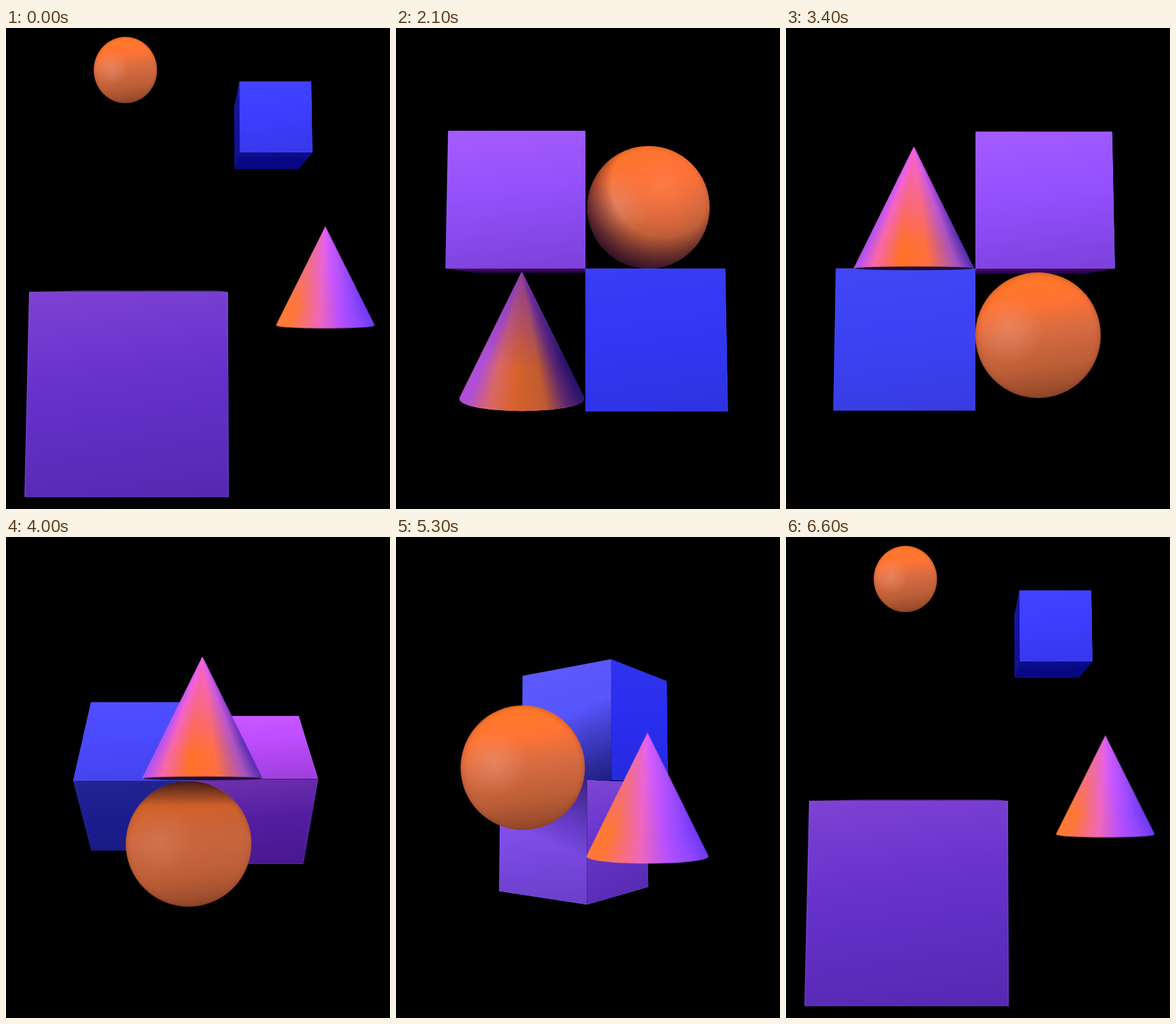
An HTML page without scripts for the animation above (6700 ms loop, 600x750 px).

```html
<!DOCTYPE html>
<html lang="en">
<head>
<meta charset="utf-8">
<title>Turning solids</title>
<style>
html, body { margin: 0; width: 100%; height: 100%; overflow: hidden; background: #000; }
.stage {
  position: relative; width: 600px; height: 750px; overflow: hidden; background: #000;
  perspective: 800px; perspective-origin: 300px 350px;
}
.stage *, .stage ::before, .stage ::after {
  position: absolute;
  animation: 6.7s cubic-bezier(.65, 0, .35, 1) infinite;
}

/* cubes: real 3D, slightly pitched camera */
.scene, .sink, .cube { transform-style: preserve-3d; }
.scene { left: 296px; top: 375px; transform: rotateX(4deg) translateZ(3px); }
.sink { animation-name: sink; }
.cube i {
  left: -109px; top: -109px; width: 218px; height: 218px;
  border-radius: 1px; overflow: hidden; backface-visibility: hidden;
  box-shadow: inset 0 0 2px var(--rim);
  background-image: linear-gradient(172deg, var(--lit), transparent 45%, var(--dim));
}
.cube .f { transform: translateZ(109px); }
.cube .l { transform: rotateY(-90deg) translateZ(109px); }
.cube .t { transform: rotateX(90deg) translateZ(109px); }
.cube .b { transform: rotateX(-90deg) translateZ(109px); }
.l::before, .l::after { content: ""; inset: 0; opacity: 0; }
.l::before { background: linear-gradient(195deg, #140858b0, transparent 50%); }
.l::after { background: linear-gradient(345deg, #0c0a50b0, transparent 55%); }

.blue { --lit: #ffffff08; --dim: #00002018; --rim: #7070ff80; animation-name: blue; }
.blue .f { animation-name: blue-f; }
.blue .l { animation-name: blue-l; }
.blue .t { background-color: #4a4aff; }
.blue .b { animation-name: blue-b; }
.blue .l::before, .purple .l::after { animation-name: shade-1; }
.blue .l::after, .purple .l::before { animation-name: shade-2; }

.purple { --lit: #ffa0ff28; --dim: #10004030; --rim: #a880ffb0; animation-name: purple; }
.purple .f { animation-name: purple-f; }
.purple .l { animation-name: purple-l; }
.purple .t { animation-name: purple-t; }
.purple .b { animation-name: purple-b; }

@keyframes sink {
  0%, 10.67%, 29.78%, 31.3%, 48.5%, 49.4%, 69.25%, 69.85%, 87.16%, 100% { transform: translateZ(0); }
  20.22%, 39.9%, 59.33%, 78.5% { transform: translateZ(-158px); }
}
@keyframes blue {
  0%, 98.5%, 100% { transform: translate3d(238px, -483px, -820px) rotateX(0deg); }
  10.67% { transform: translate3d(109px, -109px, -109px) rotateX(0deg); }
  29.78% { transform: translate3d(109px, 109px, -109px) rotateX(90deg); }
  29.79%, 31.3% { transform: translate3d(109px, 109px, -109px) rotateY(0deg); }
  48.5%, 49.4% { transform: translate3d(-109px, 109px, -109px) rotateY(90deg); }
  49.41% { transform: translate3d(-109px, 109px, -109px) rotateX(0deg); }
  69.25% { transform: translate3d(-109px, -109px, -109px) rotateX(-90deg); }
  69.26%, 69.85% { transform: translate3d(-109px, -109px, -109px) rotateY(0deg); }
  87.16% { transform: translate3d(109px, -109px, -109px) rotateY(90deg); }
  87.17% { transform: translate3d(109px, -109px, -109px) rotateX(0deg); animation-timing-function: cubic-bezier(.55, 0, .25, 1); }
}
@keyframes purple {
  0%, 98.5%, 100% { transform: translate3d(-72px, 143.5px, 125.5px) rotateX(0deg); }
  10.67% { transform: translate3d(-109px, 109px, -109px) rotateX(0deg); }
  29.78% { transform: translate3d(-109px, -109px, -109px) rotateX(-90deg); }
  29.79%, 31.3% { transform: translate3d(-109px, -109px, -109px) rotateY(0deg); }
  48.5%, 49.4% { transform: translate3d(109px, -109px, -109px) rotateY(90deg); }
  49.41% { transform: translate3d(109px, -109px, -109px) rotateX(0deg); }
  69.25% { transform: translate3d(109px, 109px, -109px) rotateX(90deg); }
  69.26%, 69.85% { transform: translate3d(109px, 109px, -109px) rotateY(0deg); }
  87.16% { transform: translate3d(-109px, 109px, -109px) rotateY(90deg); }
  87.17% { transform: translate3d(-109px, 109px, -109px) rotateX(0deg); animation-timing-function: cubic-bezier(.55, 0, .25, 1); }
}

/* light on each face; a face hands over its colour when a turn ends */
@keyframes blue-f {
  0%, 98.5%, 100% { background-color: #3d3dff; }
  10.67% { background-color: #3b3dfb; }
  29.78% { background-color: #5a5aff; }
  29.79% { background-color: #3238f4; }
  49.4% { background-color: #16149c; }
  49.41% { background-color: #3c42f5; }
  69.25% { background-color: #00003b; }
  69.26% { background-color: #4a4aff; }
  87.16% { background-color: #161de4; }
  87.17% { background-color: #3b3dfb; }
}
@keyframes blue-l {
  0%, 29.78%, 87.17%, 100% { background-color: #1111a0; }
  29.79% { background-color: #4a50d8; }
  49.4% { background-color: #3c42f5; }
  69.25% { background-color: #8a80fd; }
  87.16% { background-color: #3b3dfb; }
}
@keyframes blue-b {
  0%, 10.67%, 29.79%, 100% { background-color: #080886; }
  29.78% { background-color: #3238f4; }
}
@keyframes purple-f {
  0%, 98.5%, 100% { background-color: #6631cb; }
  10.67% { background-color: #6c35dc; }
  29.78% { background-color: #2c1070; }
  29.79% { background-color: #9450fb; }
  49.4% { background-color: #5d36c3; }
  49.41% { background-color: #9450ff; }
  69.25% { background-color: #e04aff; }
  69.26% { background-color: #6c35d8; }
  87.16% { background-color: #6434c4; }
  87.17% { background-color: #6c35dc; }
}
@keyframes purple-l {
  0%, 29.78%, 100% { background-color: #6830e8; }
  49.4% { background-color: #9450ff; }
  69.25% { background-color: #a078ff; }
  87.16% { background-color: #6c35dc; }
}
@keyframes purple-t {
  0%, 10.67%, 29.79%, 100% { background-color: #6a2fb0; }
  29.78% { background-color: #9450fb; }
}
@keyframes purple-b {
  0%, 49.4%, 69.26%, 100% { background-color: #35005d; }
  69.25% { background-color: #6c35d8; }
}
@keyframes shade-1 { 0%, 31%, 49%, 100% { opacity: 0; } 40%, 42% { opacity: 1; } }
@keyframes shade-2 { 0%, 70%, 87%, 100% { opacity: 0; } 77%, 80% { opacity: 1; } }

/* sphere */
.ball {
  left: -98px; top: -98px; width: 196px; height: 196px; border-radius: 50%; overflow: hidden;
  background:
    radial-gradient(circle at 27% 46%, #f0a08870, transparent 30%),
    linear-gradient(172deg, #ff7a28 4%, #ff7434 28%, #d86c42 48%, #bd5f38 72%, #8c4428 98%);
  box-shadow: inset 0 0 9px #70281870;
  animation-name: ball;
}
.ball::before, .ball::after { content: ""; inset: 0; opacity: 0; }
.ball::before {
  background: linear-gradient(#180818d0, #80402060 20%, #b8603c80 45%, transparent);
  animation-name: ball-top;
}
.ball::after {
  background: radial-gradient(circle at 62% 32%, #ff7e48d0, #ff703c80 22%, #c0583010 46%, #2a0c28e0 76%);
  animation-name: ball-side;
}
@keyframes ball {
  0%, 98.5%, 100% { transform: translate(186.5px, 65.5px) scale(.505, .528); }
  10.67% { transform: translate(198px, 280.5px) scale(.985); }
  29.78%, 31.3% { transform: translate(394.5px, 279.5px) scale(.975); }
  48.5%, 49.4% { transform: translate(394.5px, 479px) scale(1); }
  69.25%, 69.85% { transform: translate(198px, 478px) scale(1); }
  87.16% { transform: translate(198px, 280.5px) scale(.985); animation-timing-function: cubic-bezier(.55, 0, .25, 1); }
}
@keyframes ball-top { 0%, 50%, 70%, 100% { opacity: 0; } 58%, 61% { opacity: 1; } }
@keyframes ball-side { 0%, 19%, 39%, 100% { opacity: 0; } 29%, 32% { opacity: 1; } }

/* cone: rays of colour from the tip, rounded at the foot */
.cone { left: 0; top: 0; animation-name: cone; }
.cone i { left: -97px; top: 0; width: 194px; height: 222px; animation-name: foot; }
.cone u { left: 0; top: 0; animation-name: warm; }
.cone .dusk { animation-name: dusk; }
.side {
  background:
    radial-gradient(circle at 50% 0, #e060ffd8, transparent 165px),
    conic-gradient(from 153deg at 50% 0, #6c38f0, #9048ff 8deg, #b850fc 18deg, #f068b8 31deg, #ff7838 47deg, #ff7838);
}
.mid {
  background:
    radial-gradient(circle at 50% 0, #f060f8d8, transparent 160px),
    conic-gradient(from 153deg at 50% 0, #4a28b0, #a854c0 7deg, #ff7040 20deg, #ff7028 34deg, #f868a8 46deg, #b050ff 53deg, #b050ff);
}
.dark {
  background:
    radial-gradient(circle at 50% 0, #8038b0d0, transparent 150px),
    conic-gradient(from 153deg at 50% 0, #20106c, #5a2870 8deg, #c05c34 17deg, #d8642c 30deg, #d86868 41deg, #b050d8 50deg, #9040e0);
}
.cone b {
  left: -95px; top: 193px; width: 190px; height: 6px; border-radius: 50%;
  background: #1c0c38; opacity: 0; animation-name: under;
}
@keyframes cone {
  0%, 98.5%, 100% { transform: translate(499px, 309px) scale(.797); }
  10.67% { transform: translate(393px, 383px) scale(.995); }
  29.78%, 31.3% { transform: translate(196.5px, 381px) scale(1.003); }
  48.5%, 49.4% { transform: translate(199px, 185px) scale(.968); }
  69.25%, 69.85% { transform: translate(393px, 188px) scale(.968); }
  87.16% { transform: translate(393px, 383px) scale(.995); animation-timing-function: cubic-bezier(.55, 0, .25, 1); }
}
@keyframes foot {
  0%, 98.5%, 100% { clip-path: path("M97 0L194 194C194 202 0 202 0 194Z"); }
  10.67%, 29.78%, 31.3%, 87.16% { clip-path: path("M97 0L194 196C194 222 0 222 0 196Z"); }
  48.5%, 69.85% { clip-path: path("M97 0L194 196C194 196 0 196 0 196Z"); }
}
@keyframes warm {
  0%, 10.67%, 78%, 100% { opacity: 0; }
  29.78%, 69.25% { opacity: 1; }
}
@keyframes dusk { 0%, 14%, 40%, 100% { opacity: 0; } 29.78%, 31.3% { opacity: 1; } }
@keyframes under { 0%, 42%, 76%, 100% { opacity: 0; } 49.4%, 69.25% { opacity: 1; } }
</style>
</head>
<body>
<div class="stage">
  <div class="scene">
    <div class="sink">
      <div class="cube blue"><i class="f"></i><i class="l"></i><i class="t"></i><i class="b"></i></div>
      <div class="cube purple"><i class="f"></i><i class="l"></i><i class="t"></i><i class="b"></i></div>
    </div>
  </div>
  <div class="ball"></div>
  <div class="cone">
    <i class="side"></i>
    <u><i class="mid"></i></u>
    <u class="dusk"><i class="dark"></i></u>
    <b></b>
  </div>
</div>
</body>
</html>
```
